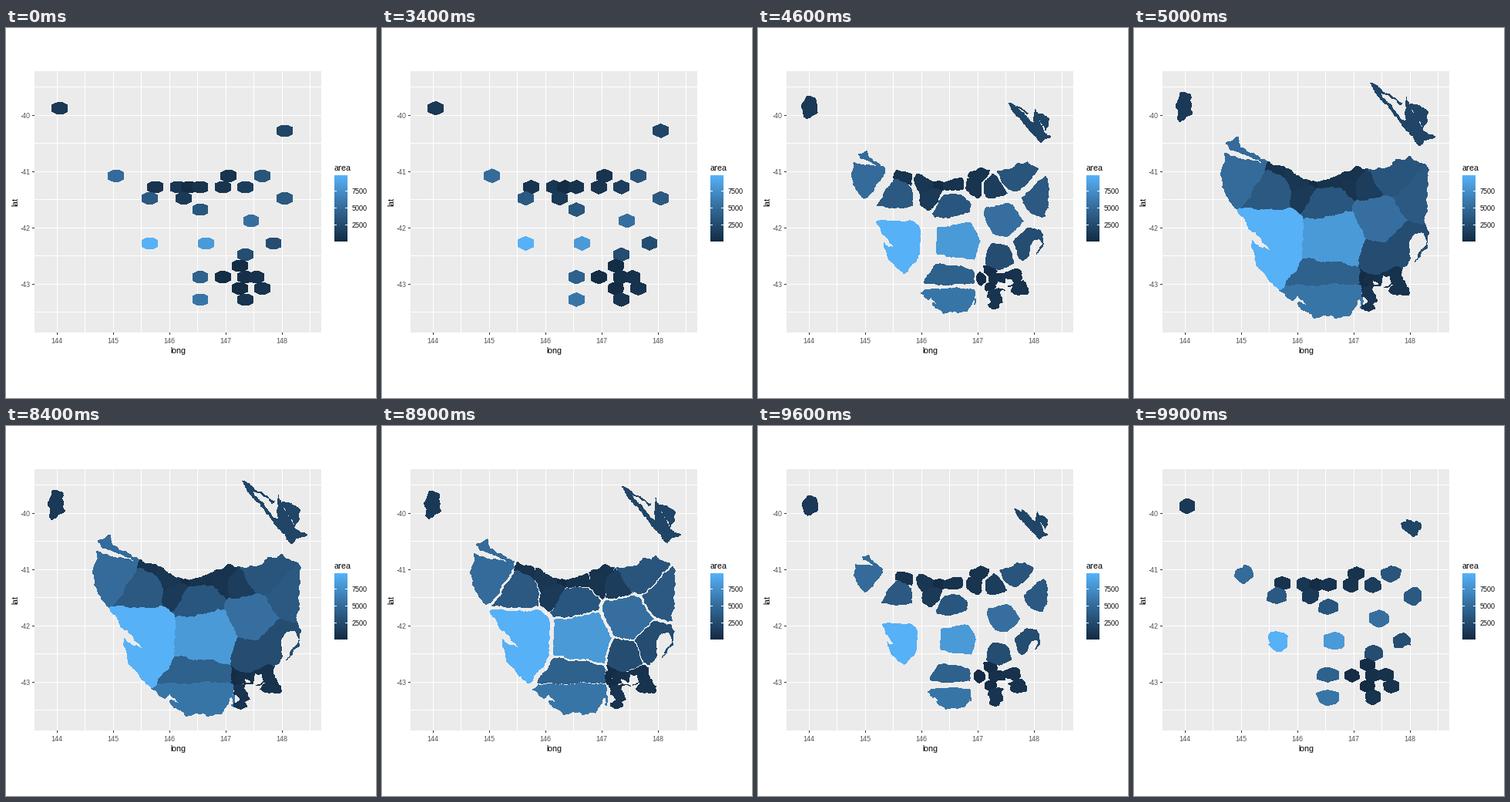
These frames come from a looping animation (480 by 480 pixels, 10 s). A matplotlib script:

```python
import random

import matplotlib.pyplot as plt
import numpy as np
from matplotlib.animation import FuncAnimation
from matplotlib.collections import PolyCollection
from matplotlib.colors import LinearSegmentedColormap
from matplotlib.patches import Rectangle
from matplotlib.path import Path

SIZE, DPI = 480, 96
PX = 72 / DPI
STEPS = 17
FRAMES, INTERVAL = 100, 100

plt.rcParams.update({"font.family": "Liberation Sans", "text.hinting": "native",
                     "text.hinting_factor": 1})
BLUES = LinearSegmentedColormap.from_list("blues", ["#132B43", "#336A98", "#56B1F7"])

HEX = np.array([(9.8, -4.4), (9.8, 4.4), (0, 8.8), (-9.8, 4.4), (-9.8, -4.4), (0, -8.8)])
REST = np.array([(9.8, -4.2), (9.8, 4.2), (3.2, 7.4), (-3.2, 7.4),
                 (-9.8, 4.2), (-9.8, -4.2), (-3.2, -7.4), (3.2, -7.4)])

# Hexagon column, row and area in square km
ISLES = [(0, 0, 1094), (40, 2, 1997)]
COUNCILS = [
    (10, 6, 4891), (30, 6, 653), (36, 6, 3223), (17, 7, 611), (21, 7, 933),
    (23, 7, 111), (25, 7, 600), (29, 7, 690), (33, 7, 1414), (16, 8, 3526),
    (22, 8, 1156), (40, 8, 3524), (25, 9, 3320), (34, 10, 5136), (16, 12, 9584),
    (26, 12, 7982), (38, 12, 2591), (33, 13, 2615), (32, 14, 171), (25, 15, 4108),
    (29, 15, 121), (33, 15, 378), (35, 15, 584), (32, 16, 78), (36, 16, 661),
    (25, 17, 5507), (33, 17, 720),
]

KING = [(61, 83), (74, 87), (76, 110), (60, 122), (56, 118), (58, 108), (54, 99)]
FLINDERS = [(306, 71), (348, 97), (345, 100), (320, 83), (353, 126), (353, 89), (357, 100),
            (368, 100), (382, 110), (380, 122), (374, 131), (358, 104), (376, 134),
            (391, 141), (376, 146), (371, 153), (364, 147), (357, 135)]
MAINLAND = [
    (112, 190), (118, 162), (150, 171), (174, 177), (124, 157), (119, 149), (135, 141),
    (138, 155), (180, 178), (203, 184), (211, 192), (225, 197), (245, 198), (258, 194),
    (268, 190), (290, 179), (313, 184), (335, 178), (340, 170), (352, 172), (358, 166),
    (379, 178), (379, 210), (381, 238), (376, 250), (383, 266), (381, 285), (364, 304),
    (379, 282), (376, 266), (364, 266), (358, 275), (358, 300), (349, 310), (347, 322),
    (357, 338), (355, 347), (343, 346), (330, 341), (337, 334), (333, 322), (322, 320),
    (320, 334), (309, 327), (308, 340), (316, 354), (309, 358), (313, 364), (301, 367),
    (293, 362), (304, 357), (299, 348), (290, 353), (279, 374), (262, 377), (246, 372),
    (234, 377), (212, 356), (230, 364), (212, 347), (206, 354), (183, 335), (158, 303),
    (153, 275), (162, 284), (178, 289), (162, 270), (152, 263), (134, 236), (115, 207),
]


def split(a, b, rng, amp=0.16):
    """Midpoint displacement from a to b, without b itself."""
    dx, dy = b[0] - a[0], b[1] - a[1]
    dist = np.hypot(dx, dy)
    if dist < 2:
        return [a]
    k = rng.uniform(-amp, amp) * min(1, 14 / dist)
    mid = ((a[0] + b[0]) / 2 - dy * k, (a[1] + b[1]) / 2 + dx * k)
    return split(a, mid, rng) + split(mid, b, rng)


def rough(nodes):
    """Rough closed outline; an edge shared by two shapes gets the same bends."""
    pts = []
    for a, b in zip(nodes, nodes[1:] + nodes[:1]):
        p, q = sorted((a, b))
        rng = random.Random(str([round(v) for v in p + q]))
        run = split(p, q, rng) + [q]
        pts += (run if p == a else run[::-1])[:-1]
    return pts


def center(col, row):
    return np.array([69.65 + 7.3 * col, 104.2 + 14.6 * row])


def balance(coast, sites, areas):
    """Power diagram weights that give every cell its share of the land."""
    grid = np.stack(np.meshgrid(np.arange(110, 386, 2), np.arange(140, 380, 2)), -1)
    grid = grid.reshape(-1, 2)
    grid = grid[Path(coast).contains_points(grid)]
    dist = ((grid[:, None] - sites) ** 2).sum(axis=2)
    goal = areas / areas.sum() * 4 * len(grid)
    w = goal / np.pi
    for t in range(250):
        owner = np.argmin(dist - w, axis=1)
        w = w + 0.2 / (1 + t / 60) * (goal - 4 * np.bincount(owner, minlength=len(w)))
    return w


def clip(poly, n, c):
    """Part of a polygon where n . p <= c."""
    out = []
    side = [n[0] * x + n[1] * y - c for x, y in poly]
    for k, (b, sb) in enumerate(zip(poly, side)):
        a, sa = poly[k - 1], side[k - 1]
        if (sa > 0) != (sb > 0):
            t = sa / (sa - sb)
            out.append((a[0] + t * (b[0] - a[0]), a[1] + t * (b[1] - a[1])))
        if sb <= 0:
            out.append(b)
    return out


def cells(coast, sites, w):
    for i, s in enumerate(sites):
        poly = coast
        for j, o in enumerate(sites):
            if j != i:
                poly = clip(poly, 2 * (o - s), o @ o - s @ s + w[i] - w[j])
        yield rough(poly)


def along(shape, s):
    """Points at the perimeter fractions s of a closed shape."""
    ring = np.vstack([shape, shape[:1]])
    d = np.r_[0, np.cumsum(np.hypot(*np.diff(ring, axis=0).T))]
    s = np.mod(s, 1) * d[-1]
    return np.column_stack([np.interp(s, d, ring[:, k]) for k in (0, 1)])


def pair(mid, pts):
    """Hexagon points in the best rotation, with the land points they become."""
    land = np.array(pts, float)
    x, y = land.T
    if (x * np.roll(y, -1) - y * np.roll(x, -1)).sum() < 0:
        land = land[::-1]
    seg = np.hypot(*(np.roll(land, -1, axis=0) - land).T)
    s = np.r_[0, np.cumsum(seg)[:-1]] / seg.sum()
    rel = land - (land.min(axis=0) + land.max(axis=0)) / 2
    options = [along(HEX, s + k / 48) for k in range(48)]
    return min(options, key=lambda h: ((h - rel) ** 2).sum()) + mid, land


coast = rough(MAINLAND)
sites = np.array([center(c, r) for c, r, _ in COUNCILS])
areas = np.array([a for _, _, a in COUNCILS])
lands = [rough(KING), rough(FLINDERS), *cells(coast, sites, balance(coast, sites, areas))]
mids = [center(c, r) for c, r, _ in ISLES] + list(sites)
pairs = [pair(m, land) for m, land in zip(mids, lands)]


fig = plt.figure(figsize=(SIZE / DPI, SIZE / DPI), dpi=DPI, facecolor="white")
ax = fig.add_axes([0, 0, 1, 1])


def hline(y, x0, x1, color="white"):
    ax.add_patch(Rectangle((x0, y), x1 - x0, 1, color=color, lw=0, zorder=2))


def vline(x, y0, y1, color="white"):
    ax.add_patch(Rectangle((x, y0), 1, y1 - y0, color=color, lw=0, zorder=2))


def label(x, y, text, size=9, color="#4D4D4D", **kw):
    kw = {"ha": "center", "va": "center_baseline", **kw}
    ax.text(x, y, text, fontsize=size * PX, color=color, **kw)


LEFT, TOP, RIGHT, BOTTOM = 37, 56, 409, 395
ax.add_patch(Rectangle((LEFT, TOP), RIGHT - LEFT, BOTTOM - TOP, color="#EBEBEB", lw=0, zorder=1))
for k in range(5):
    x, y = 66 + 73 * k, 113 + 73 * k
    vline(x, TOP, BOTTOM)
    vline(x + 36, TOP, BOTTOM)
    hline(y - 37, LEFT, RIGHT)
    vline(x, BOTTOM, BOTTOM + 3, "#333333")
    label(x, 405.5, str(144 + k))
    if k < 4:
        hline(y, LEFT, RIGHT)
        hline(y, LEFT - 3, LEFT, "#333333")
        label(32, y + 0.5, str(-40 - k), ha="right")
label(223, 422, "long", 11, "black", va="baseline")
label(12, 225.5, "lat", 11, "black", rotation=90, va="center")

# Colour bar
label(426, 185, "area", 11, "black", ha="left", va="baseline")
ax.imshow(np.linspace(1, 0, 256)[:, None], cmap=BLUES, aspect="auto",
          extent=(426, 443, 277, 191), zorder=1)
for k in (1, 2, 3):
    y = 277 - 22 * k
    hline(y, 426, 429)
    hline(y, 440, 443)
    label(449, y + 0.5, str(2500 * k), color="black", ha="left")

tones = [BLUES(a / areas.max()) for _, _, a in ISLES + COUNCILS]
shapes = PolyCollection([], facecolors=tones, linewidths=0, antialiaseds=False, zorder=3)
ax.add_collection(shapes)
ax.set_xlim(0, SIZE)
ax.set_ylim(SIZE, 0)
ax.axis("off")


def spread(i):
    """0 for hexagons, 1 for the full map, quadratic ease-in both ways."""
    if i < 50:
        return (max(i - 33, 0) / STEPS) ** 2
    return 1 - (max(i - 83, 0) / STEPS) ** 2


def draw(i):
    p = spread(i)
    if p == 0:
        verts = [REST + m for m in mids]
    else:
        verts = [h + (land - h) * p for h, land in pairs]
    shapes.set_verts(verts)
    return [shapes]


anim = FuncAnimation(fig, draw, frames=FRAMES, interval=INTERVAL, repeat=True,
                     repeat_delay=0, init_func=lambda: draw(0))
plt.show()
```
